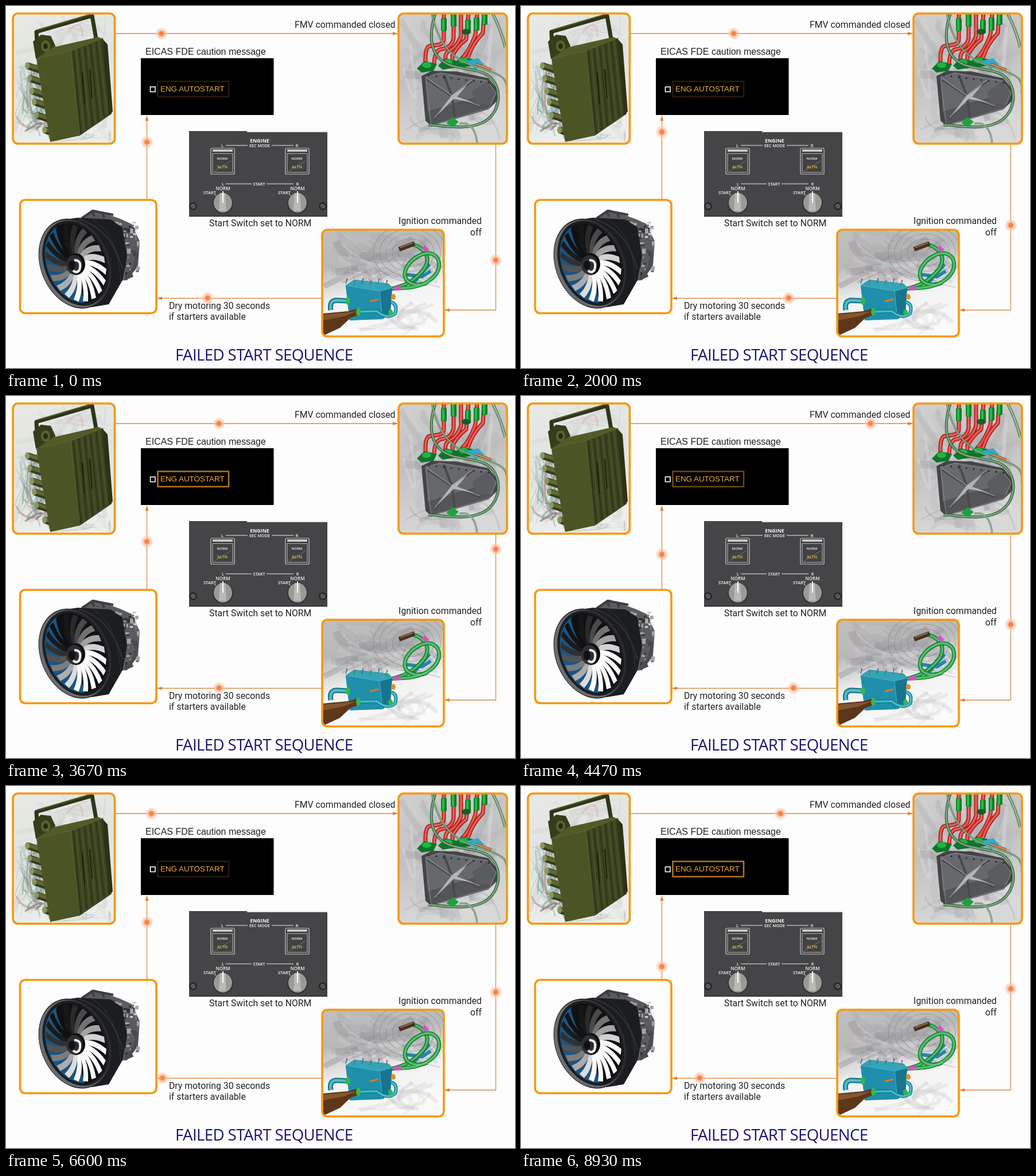
Write an HTML page that moves like this. It is 887 px wide and 631 px high and loops after 8990 ms.

```html
<!DOCTYPE html>
<html lang="en">
<head>
<meta charset="utf-8">
<title>Failed start sequence</title>
<style>
html, body { margin: 0; width: 100%; height: 100%; overflow: hidden; background: #fdfdfd; }
svg { display: block; width: 100vw; height: 100vh; }
.label { font: 15.8px Roboto, sans-serif; fill: #222; }
.arial { font: 16px "Liberation Sans", Arial, sans-serif; fill: #222; }
.title { font: 27.6px "Open Sans", sans-serif; letter-spacing: -.6px; fill: #17176f; }
.panel { font: 600 7.2px "Open Sans", sans-serif; fill: #f4f4f4; text-anchor: middle; }
</style>
</head>
<body>
<svg id="stage" viewBox="0 0 887 631" preserveAspectRatio="none"></svg>
<script>
const LOOP = 8990, STEP = LOOP / 135;
const stage = document.getElementById('stage');

let seed = 7;
const rnd = (lo = 0, hi = 1) => {
  seed = (seed * 16807) % 2147483647;
  return lo + (hi - lo) * seed / 2147483647;
};
const pick = list => list[Math.floor(rnd(0, list.length))];

const poly = (points, fill, extra = '') => `<polygon points="${points}" fill="${fill}" ${extra}/>`;
const line = (d, color, width = 1, extra = '') =>
  `<path d="${d}" fill="none" stroke="${color}" stroke-width="${width}" stroke-linejoin="round" ${extra}/>`;
const rect = (x, y, w, h, fill, extra = '') =>
  `<rect x="${x}" y="${y}" width="${w}" height="${h}" fill="${fill}" ${extra}/>`;
const disc = (x, y, rx, ry, fill, extra = '') =>
  `<ellipse cx="${x}" cy="${y}" rx="${rx}" ry="${ry}" fill="${fill}" ${extra}/>`;
const text = (x, y, s, cls, extra = '') => `<text x="${x}" y="${y}" class="${cls}" ${extra}>${s}</text>`;
const tube = (d, dark, color, width, light = '#ffffff55') =>
  line(d, dark, width) + line(d, color, width * .72) + line(d, light, width * .2);

// Soft translucent background pipes and sheets
function haze(x, y, w, h, count, colors, maxWidth, alpha) {
  let out = '';
  for (let i = 0; i < count; i++) {
    const p = () => `${rnd(x, x + w).toFixed(1)} ${rnd(y, y + h).toFixed(1)}`;
    out += line(`M${p()}Q${p()} ${p()}`, pick(colors), rnd(.6, maxWidth).toFixed(1),
      `opacity="${rnd(alpha * .3, alpha).toFixed(2)}"`);
  }
  return out;
}

// Backdrop stops run from top to bottom
function card(id, x, y, w, h, backdrop, art) {
  const box = `x="${x}" y="${y}" width="${w}" height="${h}" rx="9"`;
  const stops = backdrop.map((c, i) => `<stop offset="${i / (backdrop.length - 1)}" stop-color="${c}"/>`).join('');
  return `<clipPath id="${id}"><rect ${box}/></clipPath>
    <linearGradient id="${id}-back" x2=".25" y2="1">${stops}</linearGradient>
    <g clip-path="url(#${id})"><rect ${box} fill="url(#${id}-back)"/>${art}</g>
    <rect ${box} fill="none" stroke="#f6980f" stroke-width="3.6"/>`;
}

function controller() {
  let out = haze(14, 15, 172, 222, 22, ['#b4bab6', '#d2d6d3', '#c4c8ca'], 12, .3)
    + haze(14, 95, 75, 140, 44, ['#5d9c70', '#8fb49a', '#b87f7f', '#87a9bd', '#5c6b62'], 4, .6)
    + haze(80, 195, 105, 44, 16, ['#8cae93', '#a4b5aa', '#a7a7a7'], 3, .6)
    + haze(75, 15, 105, 42, 8, ['#df9c9c', '#9fcbb2', '#c5c5c5'], 4, .45);
  for (const [x, y] of [[50, 110], [54, 132], [58, 154], [62, 173], [66, 196], [80, 222]])
    out += line(`M${x - 13} ${y - 6}L${x + 14} ${y + 3}`, '#353d1b', 12)
      + line(`M${x - 12} ${y - 7}L${x + 14} ${y + 1}`, '#5d6936', 7)
      + disc(x - 13, y - 6, 4, 6, '#8b9760');
  out += line('M55 84L53 45L150 17L157 57', '#30361a', 7)
    + line('M54 42L149 14', '#525a2a', 2)
    + poly('47,62 61,50 78,52 86,69 82,84 52,92', '#363d1b')
    + disc(69, 70, 8, 10, '#59622f') + disc(69, 70, 4, 5, '#252b12')
    + poly('53,92 82,72 161,54 170,58 113,80', '#525b28')
    + poly('53,92 113,78 128,226 77,237', '#4a5424')
    + poly('113,78 169,56 184,188 127,227', '#3c4420');
  for (let i = 0; i < 11; i++) {
    const x = 117 + i * 5, y = 78 - i * 2;
    out += line(`M${x} ${y}L${x + 14} ${y + 144 - i * 1.6}`, i % 2 ? '#4d562a' : '#292f15', 1.6);
  }
  return out + line('M53 92L113 78L128 226M113 78L169 56', '#5d6733', 1)
    + line('M133 116l4 55M146 110l4 52', '#1b200b', 2)
    + poly('169,58 177,67 186,184 179,190', '#2c3214');
}

function meteringUnit() {
  let out = haze(686, 15, 185, 223, 50, ['#b4b4b6', '#949497', '#dededf', '#a8a8aa'], 14, .4);
  const pipes = ['M763 13V56Q763 67 751 68L738 70Q730 72 731 98', 'M780 13V56Q777 73 759 75Q747 77 746 101',
    'M793 13V52Q786 72 772 78Q764 82 766 98', 'M806 13L802 58Q789 67 778 86V99', 'M821 13L818 50Q806 82 794 91',
    'M833 13L831 47Q812 67 805 90'];
  out += pipes.map(d => tube(d, '#8d1714', '#e03a31', 7)).join('');
  for (const [x, y] of [[763, 31], [780, 23], [805, 34], [820, 30], [834, 20]])
    out += rect(x - 5, y - 10, 10, 23, '#0f7e28', 'rx="2"') + rect(x - 3, y - 9, 4, 21, '#25bd45');
  for (const [x, y] of [[733, 105], [770, 100], [797, 97]])
    out += poly(`${x - 17},${y + 4} ${x - 4},${y - 9} ${x + 18},${y - 4} ${x + 12},${y + 8} ${x - 9},${y + 11}`, '#0e752a')
      + disc(x, y - 2, 8, 5, '#25b044');
  out += disc(802, 45, 8, 5, '#145f23') + poly('802,96 823,91 833,102 819,111', '#2cabc7')
    + tube('M818 101L846 111', '#88471f', '#d27b38', 4)
    + poly('724,122 742,113 785,114 841,126 860,150 856,165 841,180 741,209 731,200', '#444548')
    + poly('731,124 756,116 838,129 854,150 786,168 735,184', '#67686b')
    + poly('735,184 786,168 855,151 841,180 741,208', '#545558')
    + poly('812,150 838,131 855,151 847,172 820,170', '#5b5c5f')
    + line('M734 128L777 157L747 197M777 157L812 131M777 157L826 176M777 157L763 120M777 157L782 194', '#48494c', 4)
    + line('M734 126L777 156L747 195M777 156L812 129M777 156L826 174', '#8d8e91', 1.6)
    + poly('776,157 804,137 786,158 816,169 780,162 752,190', '#b4b5b7')
    + line('M731 124L756 117L838 130L854 151L842 178L741 208Z', '#85868a', 1);
  for (let i = 0; i < 9; i++) out += disc(737 + i * 13, 121 + i * 1.6, 1.6, 1.6, '#2b2c2f');
  return out
    + tube('M748 13C740 39 736 70 754 90C775 115 824 104 845 125C868 149 859 191 829 204C799 217 762 208 736 207', '#24432a', '#5d9164', 5)
    + tube('M742 13C751 60 773 85 799 98C848 120 878 115 872 151', '#315635', '#78a47f', 3)
    + tube('M848 13Q863 42 870 72', '#345a3a', '#83ab87', 5)
    + poly('767,204 778,194 789,202 779,211', '#1ba33a')
    + tube('M790 205Q817 201 821 239', '#46634a', '#8cab90', 3);
}

function igniter() {
  let out = haze(553, 392, 208, 100, 52, ['#a9a9ac', '#98989b', '#d8d8da', '#8f8f93'], 14, .4)
    + haze(610, 515, 150, 60, 15, ['#bbbbbd', '#d9d9da'], 8, .35);
  for (let r = 20; r < 75; r += 11) out += disc(704, 430, r, r * .78, 'none', 'stroke="#77777c" stroke-width="1.2" opacity=".4"');
  out += line('M698 468L725 472L740 462M709 484L738 450', '#2585a8', 6)
    + tube('M668 494C699 487 713 477 728 459C743 437 728 421 707 415', '#13692b', '#2aa646', 7)
    + tube('M680 492C741 493 763 461 752 440C737 416 694 445 695 468C696 485 717 490 734 482', '#13692b', '#2fae4c', 7)
    + line('M727 420l8 7M676 493l12-2', '#d451c3', 7)
    + line('M685 424L712 414', '#49301e', 8) + line('M687 421L709 413', '#8c6c4e', 2)
    + poly('592,487 607,477 667,484 673,491 668,542 599,548', '#115a70')
    + poly('592,487 607,477 667,484 673,491 651,497', '#35a3b8')
    + poly('592,487 651,497 656,546 599,548', '#1f8fab')
    + poly('651,497 673,491 670,537 656,546', '#187590')
    + line('M592 487L651 497L673 491M651 497L656 546', '#4bb4c6', 1)
    + line('M634 515L649 511', '#e07a28', 3);
  for (let i = 0; i < 6; i++)
    out += line(`M${592 + i * 14} ${484 + i % 2 * 3}l2 -7`, i % 2 ? '#3d8d48' : '#23758c', 1.5)
      + disc(594 + i * 14, 476 + i % 2 * 3, 1.5, 1.5, '#a552a8');
  return out + tube('M597 514L575 513Q563 514 566 530', '#0f5d6d', '#28a8b7', 9)
    + tube('M671 516Q683 520 678 536Q664 547 646 532L611 533', '#0f6571', '#28aabb', 6)
    + disc(596, 514, 4, 7, '#31b64f') + disc(675, 507, 4, 5, '#d89525') + disc(670, 534, 4, 5, '#31b64f')
    + poly('552,536 596,532 614,527 617,537 600,544 582,561 552,575', '#5c371a')
    + poly('552,538 596,534 611,532 589,541 552,548', '#85562f')
    + disc(614, 533, 4, 7, '#38b64e');
}

function engine() {
  let out = poly('133,367 154,355 199,371 219,380 233,410 230,454 211,478 178,480', '#595b5f');
  for (let i = 0; i < 70; i++) {
    const x = rnd(180, 229), y = rnd(374, 466);
    out += rect(x.toFixed(), y.toFixed(), rnd(2, 7).toFixed(1), rnd(2, 9).toFixed(1), pick(['#a4a5a7', '#77787b', '#303135', '#cdcdce']));
  }
  out += line('M132 370L151 357L187 364M150 359l4 8M168 361l3 8', '#3c3e42', 4)
    + poly('90,374 125,369 182,372 203,386 211,436 203,478 179,520 149,525', '#1c1d20')
    + line('M126 371Q184 388 203 459', '#323338', 2) + line('M150 371Q197 399 200 483', '#34353a', 1)
    + line('M218 426l10 5-4 25-13 16M207 475l14-6', '#4b4c50', 6)
    + '<g transform="translate(120 449) rotate(-22)">'
    + disc(0, 0, 60, 81, '#2b2c2f') + disc(-1, 0, 58, 79, '#6b6c6f') + disc(2, 0, 55, 77, '#1c1d20')
    + disc(2, 0, 51, 72, '#101114') + '<path d="M-6-71A51 72 0 0 0-10 70L1 0Z" fill="#1a5482"/>'
    + '<g transform="translate(2 0) scale(.71 1)">';
  for (let i = 0; i < 20; i++) {
    const a = i * 18, glow = (1 + Math.cos((a - 65) * Math.PI / 180)) / 2;
    const v = Math.round(16 + 234 * Math.min(1, glow * 1.2) ** 1.2);
    out += `<path transform="rotate(${a})" d="M15-4C32-9 50-6 70 8L66 19C50 6 33 1 15 4Z" fill="rgb(${v},${v},${v})"/>`;
  }
  return out + '</g></g>' + disc(122, 450, 16, 19, '#0d0e11') + disc(119, 451, 14, 17, '#2d2f33')
    + line('M119 443Q133 443 128 460Q123 467 117 461', '#f4f4f4', 4) + disc(115, 452, 6, 8, '#111216');
}

function switchPanel() {
  let out = rect(319, 218, 241, 149, '#454548') + line('M420 219H560', '#e7e7e7', 2) + line('M319 366.5H560', '#29292b', 1.5)
    + text(442, 238, 'ENGINE', 'panel', 'style="font-size:8.8px;font-weight:700"')
    + text(442, 246, 'EEC MODE', 'panel') + text(441, 313, 'START', 'panel')
    + line('M383 243H421M463 243H501M383 310H428M454 310H501', '#eee', 1.2);
  for (const x of [377, 507]) {
    const side = x < 400 ? 'L' : 'R';
    out += text(x, 246, side, 'panel') + text(x + 1, 313, side, 'panel')
      + rect(x - 20, 248, 41, 45, '#373739', 'rx="2" stroke="#d0d0d0" stroke-width="1.2"')
      + rect(x - 17, 250, 35, 4, '#c9c9c9')
      + rect(x - 17, 257, 35, 33, '#414144', 'stroke="#c5c5c5"')
      + line(`M${x - 14} 288L${x + 15} 270`, '#77777a', 1)
      + text(x, 268, 'NORM', 'panel', 'style="font-size:6px"')
      + text(x, 283, 'ALTN', 'panel', 'style="fill:#e5c51e"')
      + text(x + 1, 321, 'NORM', 'panel', 'style="font-size:8px"')
      + text(x - 22, 328, 'START', 'panel', 'style="font-size:7.6px"')
      + line(`M${x - 14} 328l5 4`, '#eee', 1)
      + disc(x + 1, 344, 18, 18, '#343436') + disc(x + 1, 343, 16, 17, '#9a9a97')
      + poly(`${x - 4},326 ${x + 5},326 ${x + 7},357 ${x - 6},357`, '#b9b9b5')
      + line(`M${x + 1} 323V343`, '#fff', 2);
  }
  for (const x of [326, 552])
    out += disc(x, 349, 7, 7, '#29292b') + disc(x, 349, 4, 4, '#626265') + line(`M${x - 3} 352l6-6`, '#222', 1);
  return out;
}

const arrow = (x, y, turn) => `<path transform="translate(${x} ${y}) rotate(${turn})" d="M0 0L-9-3V3Z" fill="#e1802f"/>`;

// Each dot: cycle length, then [time, x, y] along its route
const routes = [
  { period: 1663, keys: [[-272, 190, 48], [1290, 655, 48], [1391, 676, 48]] },
  { period: 2367, keys: [[-1228, 853.5, 241], [0, 853.5, 443], [500, 853.5, 530], [1139, 773, 530]] },
  { period: 1250, keys: [[-870, 551, 509], [380, 264, 509]] },
  { period: 942, keys: [[-645, 245.5, 338], [297, 245.5, 191]] }
];

stage.innerHTML = `<defs><radialGradient id="glow">
    <stop offset="0" stop-color="#fb7a35"/><stop offset=".34" stop-color="#fb8a4c"/>
    <stop offset=".5" stop-color="#f9b390" stop-opacity=".7"/>
    <stop offset=".85" stop-color="#f8cdb8" stop-opacity=".5"/><stop offset="1" stop-color="#f8cdb8" stop-opacity="0"/>
  </radialGradient></defs>`
  + rect(0, 0, 887, 631, '#fdfdfd')
  + line('M190 48H682M853.5 241V530H765M551 509.5H264M245.5 338V192', '#dc8b48', 1.3)
  + arrow(683, 48, 0) + arrow(764, 530, 180) + arrow(263, 509.5, 180) + arrow(245.5, 191, -90)
  + card('controller', 12, 13, 177.5, 227, ['#e9eae8', '#dfe3e0', '#eceeec'], controller())
  + card('metering', 684, 13, 189, 227, ['#cfcfd0', '#c2c2c3', '#d8d8d9'], meteringUnit())
  + card('igniter', 551, 390, 212, 186, ['#c0c0c1', '#b9b9ba', '#f2f2f2', '#fafafa'], igniter())
  + card('engine', 24.5, 338, 237.5, 197.5, ['#fdfdfd', '#fdfdfd'], engine())
  + rect(235, 91, 231.5, 99, '#000')
  + rect(251.5, 141, 8.5, 8.5, 'none', 'stroke="#fff" stroke-width="1.6"')
  + rect(264.5, 131.5, 123.5, 26.5, 'none', 'id="alert" stroke="#b87c1c" stroke-width="2.6"')
  + text(269, 149, 'ENG AUTOSTART', 'arial', 'style="font-size:13.4px;fill:#f0ad43"')
  + switchPanel()
  + text(243, 85, 'EICAS FDE caution message', 'arial')
  + text(503, 38, 'FMV commanded closed', 'label')
  + text(354, 384, 'Start Switch set to NORM', 'label')
  + text(829, 379.5, 'Ignition commanded', 'label', 'text-anchor="end"')
  + text(829, 399.5, 'off', 'label', 'text-anchor="end"')
  + text(284, 528, 'Dry motoring 30 seconds', 'label')
  + text(284, 547, 'if starters available', 'label')
  + text(295, 618, 'FAILED START SEQUENCE', 'title')
  + routes.map(() => '<circle class="dot" r="11" fill="url(#glow)"/>').join('');

const dots = stage.querySelectorAll('.dot');
const alertBox = document.getElementById('alert');

function place({ period, keys }, time) {
  const start = keys[0][0];
  const t = start + (time - start) % period;
  const i = Math.max(1, keys.findIndex(k => k[0] >= t));
  const [t0, x0, y0] = keys[i - 1], [t1, x1, y1] = keys[i];
  const f = (t - t0) / (t1 - t0);
  return [x0 + (x1 - x0) * f, y0 + (y1 - y0) * f];
}

function draw(now) {
  const time = Math.floor((now % LOOP + 10) / STEP) % 135 * STEP;
  routes.forEach((route, i) => {
    const [x, y] = place(route, time);
    dots[i].setAttribute('transform', `translate(${x.toFixed(2)} ${y.toFixed(2)})`);
  });
  const pulse = .58 - .38 * Math.cos(2 * Math.PI * (time / (STEP * 10) + .05));
  alertBox.setAttribute('opacity', pulse.toFixed(3));
}

const began = performance.now();
function tick() {
  draw(performance.now() - began);
  requestAnimationFrame(tick);
}
tick();
</script>
</body>
</html>
```
